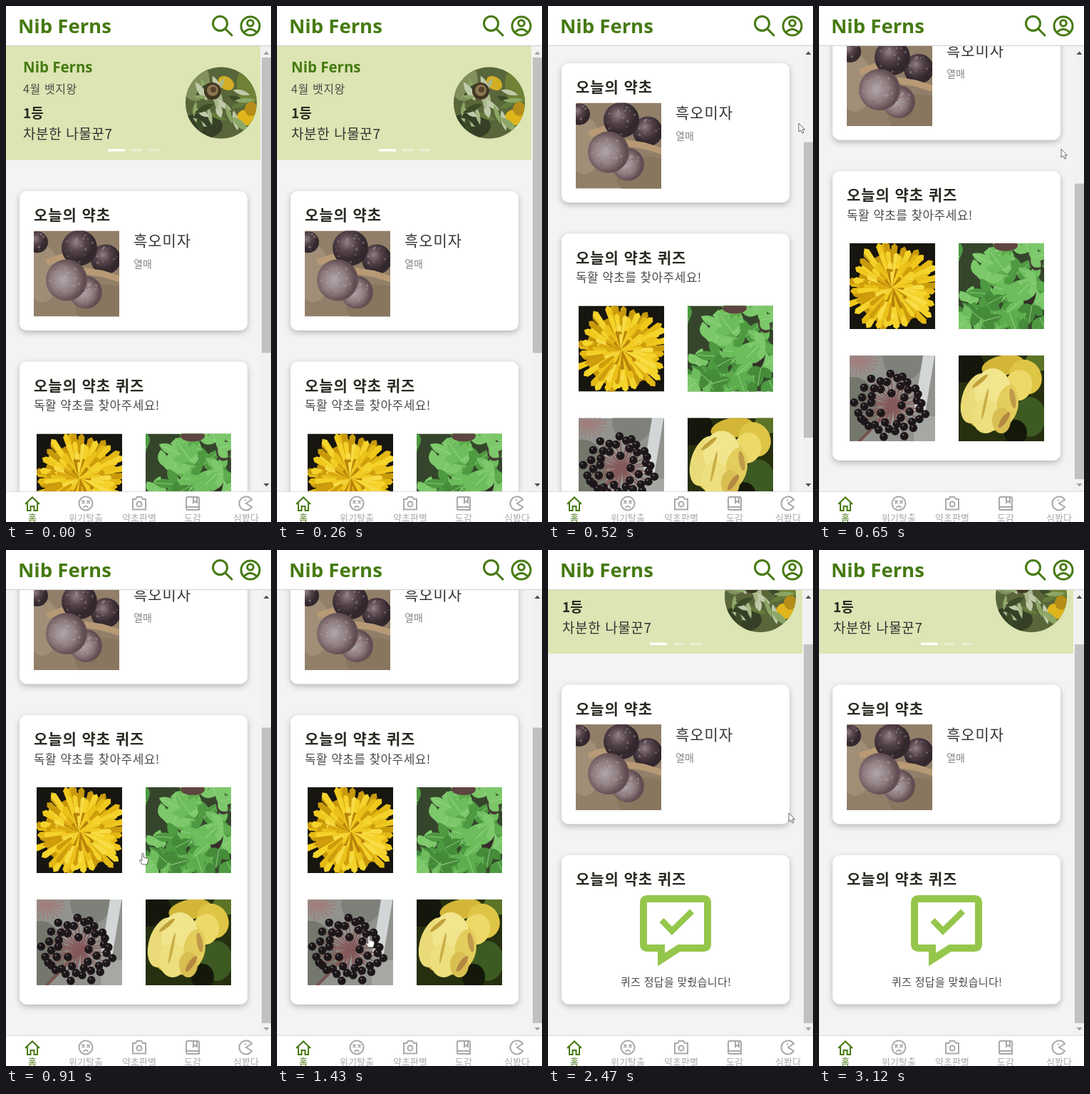
Animation, 372 px wide and 722 px high, one loop 3.25 s. Source, as an HTML page:

```html
<!DOCTYPE html>
<html lang="ko">
<head>
<meta charset="utf-8">
<title>Nib Ferns</title>
<style>
  html, body { margin: 0; width: 100%; height: 100%; overflow: hidden; background: #fff; }
  body > svg { display: block; }
  text { font-family: "Noto Sans CJK KR", "Noto Sans CJK", "Noto Sans", sans-serif; font-weight: 300; fill: #333; }
  .brand { font-family: "Open Sans", sans-serif; font-weight: 700; fill: #467a12; }
  .bold { font-weight: 700; fill: #2a2a22; }
  .soft { fill: #4c4c48; }
  .faint { fill: #858585; }
  .line { fill: none; stroke: #467a12; stroke-width: 3; stroke-linecap: round; }
  .tab { fill: none; stroke: #a9a9a9; stroke-width: 2; }
  .tab text { fill: #a9a9a9; stroke: none; font-size: 13px; text-anchor: middle; }
  .tab.on { stroke: #467a12; }
  .tab.on text { fill: #467a12; }
  .card { fill: #fff; filter: drop-shadow(0 3px 4px rgba(0, 0, 0, .25)); }
</style>
</head>
<body>
<svg id="stage" width="372" height="722" viewBox="0 0 372 722"></svg>
<script>
const STEP = 130, LOOP = 3250, TOP = 56, VIEW = 624;
const ANSWERED = 1820, QUIZ_SCROLL = 266.5, ANSWER_SCROLL = 70.5;
const scrollKeys = [[260, 0], [390, 7], [520, 179], [650, QUIZ_SCROLL]];
const cursorKeys = [
  [390, 352, 158], [520, 352, 164], [650, 340, 200], [910, 192, 424], [1430, 129, 540],
  [1820, 129, 540], [2470, 338, 368], [2730, 374, 345]
];

let seed = 7;
const random = () => (seed = (seed * 16807) % 2147483647) / 2147483647;
const between = (a, b) => a + (b - a) * random();
const pick = list => list[Math.floor(random() * list.length)];
const repeat = (n, draw) => Array.from({ length: n }, (_, i) => draw(i)).join('');

const rect = (x, y, w, h, fill, extra = '') =>
  `<rect x="${x}" y="${y}" width="${w}" height="${h}" fill="${fill}" ${extra}/>`;
const circle = (x, y, r, fill) => `<circle cx="${x}" cy="${y}" r="${r}" fill="${fill}"/>`;
const ellipse = (x, y, rx, ry, fill, turn = 0) =>
  `<ellipse rx="${rx}" ry="${ry}" fill="${fill}" transform="translate(${x} ${y}) rotate(${turn})"/>`;
const path = (d, extra = '') => `<path d="${d}" ${extra}/>`;
const text = (x, y, size, label, cls = '', spacing = 0) =>
  `<text x="${x}" y="${y}" font-size="${size}" class="${cls}" letter-spacing="${spacing}">${label}</text>`;
const card = (y, h) => `<rect class="card" x="19" y="${y}" width="320" height="${h}" rx="10"/>`;
const photo = (x, y, body) => `<svg x="${x}" y="${y}" width="120" height="120">${body}</svg>`;
const placed = (x, y, turn, fill, d) =>
  path(d, `fill="${fill}" transform="translate(${x} ${y}) rotate(${turn})"`);
const leaf = (x, y, length, width, turn, fill) =>
  placed(x, y, turn, fill, `M0 0Q${length / 2} ${-width} ${length} 0Q${length / 2} ${width} 0 0`);
const blade = (x, y, length, width, turn, fill) =>
  placed(x, y, turn, fill, `M0 -1L${length * .93} ${-width / 2}L${length} 0L${length * .93} ${width / 2}L0 1Z`);

function berries() {
  const berry = (x, y, r, tone) => circle(x, y, r, `url(#${tone})`) + repeat(r, () => {
    const a = between(0, 6.28), d = r * .85 * Math.sqrt(random());
    return circle(x + d * Math.cos(a), y + d * Math.sin(a), between(.5, 1.8), pick(['#b9aeb055', '#7f5a5766', '#d1c9c955']));
  });
  return rect(0, 0, 120, 120, '#917f69') + ellipse(12, 60, 24, 40, '#a08e77') + ellipse(100, 105, 42, 30, '#89765f') +
    berry(5, 16, 15, 'plum') + berry(101, 40, 21, 'plum') + berry(73, 86, 23, 'dusty') +
    path('M70 56L96 60L122 68M18 44L45 35', 'fill="none" stroke="#b79a75" stroke-width="9"') +
    berry(64, 24, 25, 'plum') + berry(46, 69, 29, 'dusty');
}

function dandelion() {
  const ring = (n, min, max, width, tones) => repeat(n, i =>
    blade(60, 62, between(min, max), width, i * 360 / n + between(-6, 6), pick(tones)));
  return rect(0, 0, 120, 120, '#17150f') + circle(60, 64, 50, '#c7950b') +
    ring(48, 54, 70, 9, ['#c99a0c', '#e5b914', '#f0c91d', '#f4d42c']) +
    ring(46, 36, 56, 7, ['#cf9d0b', '#eac11a', '#f4d22a', '#f8dc45']) +
    ring(40, 12, 36, 5, ['#b98409', '#dca911', '#f0ca22', '#f8dc45']);
}

function leaves() {
  const sprig = () => {
    const x = between(0, 120), y = between(4, 120), turn = between(0, 360), size = between(24, 36);
    const tone = pick(['#4e9a41', '#5dac4d', '#6dbd5d', '#7cc86a', '#458b3a']);
    return [-55, 55, 0].map(a => leaf(x, y, a ? size * .75 : size, 13, turn + a, tone)).join('') +
      placed(x, y, turn, '#a1d690', `M0 -.4H${size * .9}V.4H0Z`);
  };
  return rect(0, 0, 120, 120, '#35452c') + repeat(48, sprig) +
    ellipse(66, 3, 17, 8, '#5e453f') + ellipse(109, 24, 10, 14, '#463935') + ellipse(100, 74, 8, 17, '#352d2a', 15) +
    repeat(10, sprig);
}

function elderberries() {
  const spots = Array.from({ length: 46 }, (_, i) => {
    const r = 16 + 35 * Math.sqrt(i / 46) + between(-4, 4), a = i * 2.4;
    return [57 + r * Math.cos(a), 70 + r * .88 * Math.sin(a)];
  });
  return rect(0, 0, 120, 120, '#92938e') + ellipse(5, 75, 35, 45, '#73776c') + ellipse(75, 5, 28, 30, '#7e817a') +
    path('M98 80L112 -5', 'stroke="#d3d6d6" stroke-width="16"') + rect(90, 85, 30, 35, '#a6a8a4') +
    repeat(22, i => path(`M14 8l${26 * Math.cos(i * .3)} ${20 * Math.sin(i * .3)}`, 'stroke="#a07f7d" stroke-width="2"')) +
    path('M62 70L12 122', 'stroke="#78534f" stroke-width="4"') +
    spots.map(([x, y]) => path(`M62 70L${x} ${y}`, 'stroke="#85595a" stroke-width="1.6"')).join('') +
    spots.map(([x, y]) => circle(x, y, 5.8, '#1d171a') + circle(x - 1.5, y - 2, 1.1, '#78707a')).join('');
}

function bud() {
  return rect(0, 0, 120, 120, '#26300f') + ellipse(8, 14, 28, 24, '#15160c') + ellipse(100, 86, 22, 28, '#3d5a22') +
    ellipse(80, 108, 16, 18, '#14180b') + ellipse(112, 8, 18, 14, '#5c7427') +
    ellipse(62, 14, 30, 14, '#d3b637', -12) + ellipse(94, 30, 22, 25, '#dfc545', -30) + ellipse(84, 42, 19, 22, '#ecd968', 20) +
    ellipse(44, 66, 40, 40, '#d8bf4c') + ellipse(24, 60, 19, 36, '#eadb78', 18) +
    ellipse(48, 50, 26, 32, '#f1e58d') + ellipse(68, 70, 15, 29, '#e3cd5c', 12) +
    ellipse(38, 85, 19, 24, '#eddf7d') + ellipse(60, 91, 13, 18, '#d9be52') +
    ellipse(64, 90, 4, 13, '#b48743', 35) + ellipse(76, 60, 4, 14, '#c0994a', -10) +
    ellipse(37, 68, 2, 22, '#c9ad45', 12) + ellipse(30, 36, 3, 14, '#c0a13b', 50);
}

function garden() {
  return `<g clip-path="url(#round)">` + rect(248, 85, 100, 101, '#59663a') +
    ellipse(262, 105, 20, 28, '#81905c') + ellipse(338, 110, 18, 28, '#6f8236') + ellipse(270, 168, 30, 18, '#354027') +
    ellipse(305, 108, 12, 9, '#d3ae24', 35) + ellipse(333, 156, 13, 11, '#e0b51b') + ellipse(340, 144, 9, 10, '#b58d18') +
    repeat(24, () => leaf(between(258, 320), between(115, 160), between(20, 34), between(5, 10),
      between(-150, 100), pick(['#3c4c28', '#8ca765', '#a9b88a', '#647c3c', '#c0caaa']))) +
    circle(286, 119, 12, '#413722') + circle(286, 118, 8, '#8b7651') + circle(287, 117, 4, '#55452d') + '</g>';
}

const header = rect(0, 0, 372, 55, '#fff') + rect(0, 55, 372, 1, '#cfcfcf') +
  text(17, 38, 27.5, 'Nib Ferns', 'brand') +
  `<g class="line"><circle cx="300.5" cy="24.5" r="10"/><path d="M308 32L317 41"/>
   <circle cx="343" cy="28" r="13"/><circle cx="343" cy="24" r="4.3"/><path d="M334 37Q343 28 352 37"/></g>`;

const banner = rect(0, 56, 357, 159.5, '#dce5b3') + '<g id="slide">' +
  text(20, 93, 20.5, 'Nib Ferns', 'brand') +
  text(20, 122, 16, '4월 뱃지왕', 'soft', .6) +
  text(20, 157, 19, '1등', 'bold') +
  text(20, 186, 19, '차분한 나물꾼7', '', .6) + garden() + '</g>' +
  rect(143, 200, 24, 3.5, '#fff', 'rx="1"') +
  [176, 200].map(x => rect(x, 200, 15, 3.5, '#fff', 'rx="1" opacity=".4"')).join('');

const today = card(259, 195) + text(39, 300, 21, '오늘의 약초', 'bold', .9) + photo(39, 314.5, berries()) +
  text(179, 336, 21, '흑오미자', '', .9) + text(179, 366, 14, '열매', 'faint');

const quizTitle = text(39, 538.5, 21, '오늘의 약초 퀴즈', 'bold', .9);
const quiz = '<g id="quiz">' + card(497.5, 405) + quizTitle + text(39, 565, 17, '독활 약초를 찾아주세요!', 'soft', .4) +
  photo(43, 598.5, dandelion()) + photo(196, 598.5, leaves()) +
  photo(43, 755.5, elderberries()) + photo(196, 755.5, bud()) + '</g>';
const answer = '<g id="answer">' + card(497.5, 208.5) + quizTitle +
  `<g transform="translate(0 70.5)" fill="none" stroke="#95c64c" stroke-width="10">
   <path d="M139 488H219Q224 488 224 493V552Q224 557 219 557H184L159 573V557H139Q134 557 134 552V493Q134 488 139 488Z"/>
   <path d="M159.5 518L174 533L202 505.5" stroke-width="8.5"/></g>` +
  text(102, 680, 15, '퀴즈 정답을 맞췄습니다!', 'soft', .3) + '</g>';

const icons = [
  ['홈', 'M27 697L37 687.5L47 697M30 695V706H34.5V700H39.5V706H44V695'],
  ['위기탈출', 'M102.5 696a9.5 9.5 0 1 0 19 0a9.5 9.5 0 1 0 -19 0M106.5 692l4 4m0 -4l-4 4M113.5 692l4 4m0 -4l-4 4M108.5 702Q112 697.5 115.5 702'],
  ['약초판별', 'M178 690H182L184 687H190L192 690H196V704.5H178ZM183.5 697a3.5 3.5 0 1 0 7 0a3.5 3.5 0 1 0 -7 0'],
  ['도감', 'M255 687H269Q271 687 271 689V705H255Q253 705 253 703V689Q253 687 255 687M253 701H271M263 687V695L265.5 693L268 695V687'],
  ['심봤다', 'M345 691A9.5 9.5 0 1 0 345 701L337 696ZM336 690.5v2']
];
const tabs = rect(0, 680, 372, 42, '#fff') + rect(0, 679, 372, 1, '#dcdcdc') +
  icons.map(([label, d], i) => `<g class="tab ${i ? '' : 'on'}">${path(d)}<text x="${37 + 75 * i}" y="720.5">${label}</text></g>`).join('');

const scrollbar = rect(358, 56, 14, 624, '#f1f1f1') + rect(359, 72, 13, 0, '#c1c1c1', 'id="thumb"') +
  path('M361.5 68L365.5 63.5L369.5 68Z', 'id="up"') + path('M361.5 668L365.5 672.5L369.5 668Z', 'id="down"');

const cursor = `<g id="cursor" fill="#fff" stroke="#555" stroke-width=".9" stroke-linejoin="round">
  <path id="arrow" d="M0 0V12L2.8 9.5L5 14L7 13L5 8.8H8.5Z"/>
  <path id="hand" d="M-1.2 1Q0 -1 1.2 1V6L6 7.2Q8 8 7.5 11L6 16H-1L-4.5 10Q-4 8.5 -2.5 10L-1.2 11Z"/></g>`;

document.getElementById('stage').innerHTML = `<defs>
  <radialGradient id="plum" cx=".4" cy=".35"><stop stop-color="#8f7f86"/><stop offset=".5" stop-color="#54424a"/><stop offset="1" stop-color="#33282d"/></radialGradient>
  <radialGradient id="dusty" cx=".42" cy=".5"><stop stop-color="#b0a6aa"/><stop offset=".6" stop-color="#8f7d80"/><stop offset="1" stop-color="#624e52"/></radialGradient>
  <clipPath id="round"><circle cx="298" cy="135.5" r="50"/></clipPath></defs>` +
  rect(0, 0, 372, 722, '#f3f3f3') +
  `<svg id="page" y="${TOP}" width="358" height="${VIEW}">${banner + today + quiz + answer}</svg>` +
  scrollbar + header + tabs + cursor;

const el = id => document.getElementById(id);
const set = (id, name, value) => el(id).setAttribute(name, value);
const show = (id, on) => set(id, 'visibility', on ? 'visible' : 'hidden');

function along(keys, t) {
  const next = keys.findIndex(k => k[0] > t);
  if (next < 0) return keys[keys.length - 1].slice(1);
  if (!next) return keys[0].slice(1);
  const a = keys[next - 1], b = keys[next], u = (t - a[0]) / (b[0] - a[0]);
  return a.slice(1).map((v, i) => v + (b[i + 1] - v) * u);
}

function render(t) {
  const answered = t >= ANSWERED;
  const maxScroll = answered ? ANSWER_SCROLL : QUIZ_SCROLL;
  const scroll = Math.min(along(scrollKeys, t)[0], maxScroll);
  const scale = 590 / (VIEW + maxScroll);
  set('page', 'viewBox', `0 ${TOP + scroll} 358 ${VIEW}`);
  set('slide', 'transform', `translate(${t < STEP ? 4 : 0} 0)`);
  show('quiz', !answered);
  show('answer', answered);
  set('thumb', 'y', 72 + scroll * scale);
  set('thumb', 'height', VIEW * scale);
  set('up', 'fill', scroll > 0 ? '#505050' : '#a3a3a3');
  set('down', 'fill', scroll < maxScroll ? '#505050' : '#a3a3a3');

  const visible = t >= 390 && t < 2730, pointing = t >= 910 && !answered;
  set('cursor', 'transform', `translate(${along(cursorKeys, t).join(' ')})`);
  show('arrow', visible && !pointing);
  show('hand', visible && pointing);
}

const start = performance.now();
function tick() {
  const t = (performance.now() - start) % LOOP;
  render(Math.floor(t / STEP) * STEP);
  requestAnimationFrame(tick);
}
tick();
</script>
</body>
</html>
```
